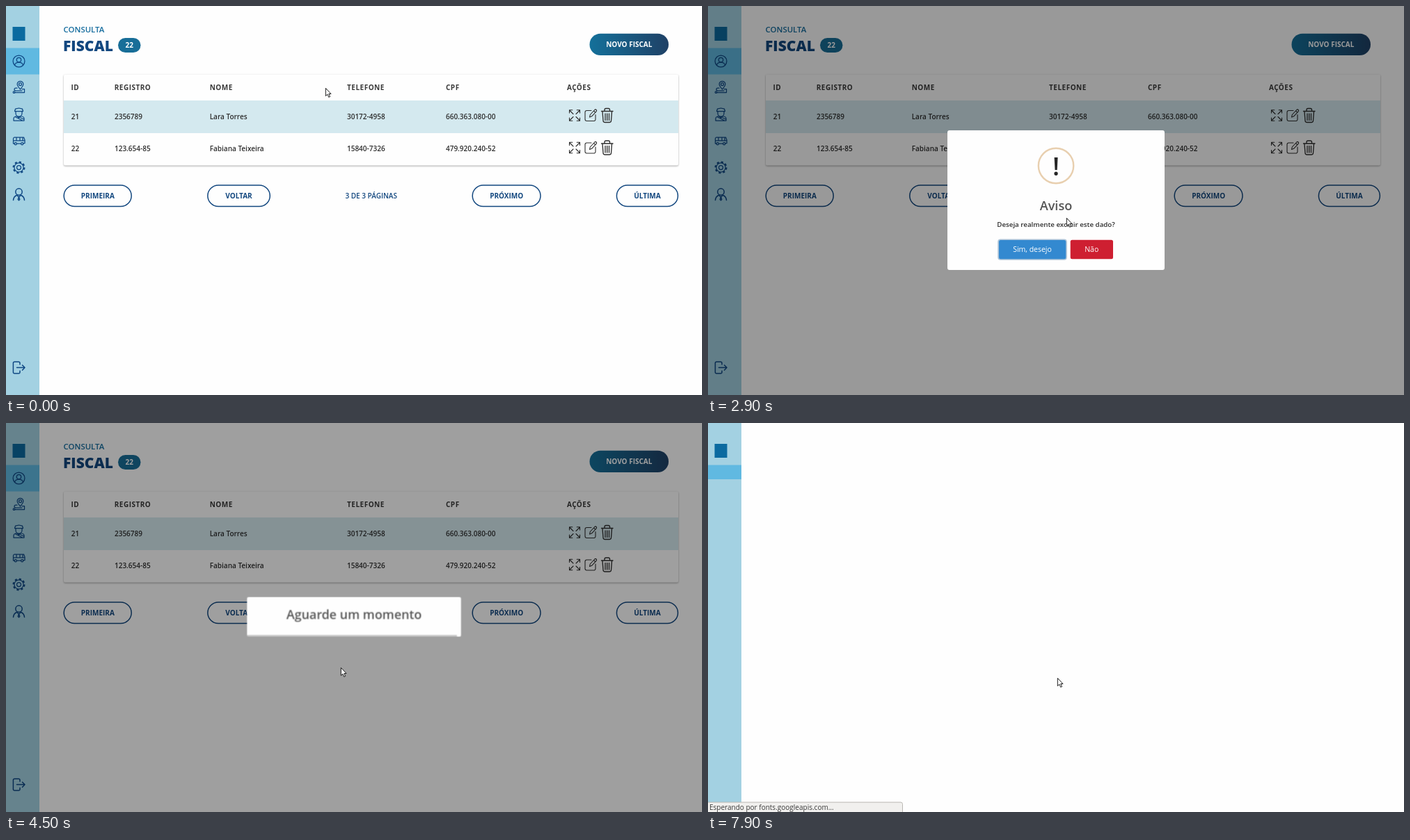
Animation, 1000 px wide and 560 px high, one loop 8 s. Source, as an HTML page:

```html
<!DOCTYPE html>
<html lang="pt-BR">
<head>
<meta charset="utf-8">
<title>Consulta fiscal</title>
<style>
html, body { margin: 0; height: 100%; overflow: hidden; background: #fefefe; }
svg { display: block; width: 100vw; height: 100vh; }
text { font: 600 10px "Open Sans", "Noto Sans", sans-serif; fill: #2e2e2e; }
.mid { text-anchor: middle; }
.bold { font-weight: 700; }
.head text { font-weight: 700; letter-spacing: .5px; fill: #3a3a3a; }
.pager rect { fill: none; stroke: #12477f; stroke-width: 1.5; }
.pager text, .blue { fill: #12477f; }
.white { fill: #fff; }
.icon { fill: none; stroke: #0f4783; stroke-width: 1.25; stroke-linecap: round; stroke-linejoin: round; }
.act { fill: none; stroke: #2e2e2e; stroke-width: 1.1; stroke-linecap: round; stroke-linejoin: round; }
.card { filter: drop-shadow(0 1px .9px rgba(0, 0, 0, .34)); }
.title { font-size: 18.1px; fill: #565656; }
.btn { font-weight: 400; font-size: 10.5px; fill: #fff; }

/* One loop is 8 s; 1% is 80 ms. */
.anim { animation: 8s linear infinite both paused; }
.step { animation-timing-function: step-end; }
#shade { animation-name: shade; }
#ask { transform-origin: 500px 279.5px; animation-name: ask; }
#wait { transform-origin: 500px 279px; animation-name: wait; }
#bar { transform-origin: 344px 0; animation-name: bar; }
#yes { animation-name: press; }
#cursor { animation-name: move; }
#arrow { animation-name: arrow; }
#hand { animation-name: hand; }
#page { animation-name: page; }
#side { animation-name: side; }
#menu { animation-name: page; }
#active { animation-name: active; }
#status { animation-name: status; }
#tls { animation-name: tls; }
#http { animation-name: http; }

@keyframes shade {
  0% { opacity: 0; }
  29.2875% { opacity: 0; animation-timing-function: ease; }
  30.5375% { opacity: .4; }
  54.375% { opacity: .4; animation-timing-function: ease; }
  55.37% { opacity: 0; }
  55.375% { opacity: 0; animation-timing-function: ease; }
  56.625% { opacity: .4; }
  86.7125% { opacity: .4; animation-timing-function: ease; }
  87.9625%, 100% { opacity: 0; }
}
@keyframes ask {
  0%, 29.28% { opacity: 0; transform: scale(.7); }
  29.2875% { opacity: 1; transform: scale(.7); animation-timing-function: ease; }
  30.975% { transform: scale(1.05); animation-timing-function: ease; }
  32.2875% { transform: scale(.95); animation-timing-function: ease; }
  33.0375% { transform: scale(1); }
  54.375% { opacity: 1; transform: scale(1); animation-timing-function: ease; }
  56.25%, 100% { opacity: 0; transform: scale(.5); }
}
@keyframes wait {
  0%, 55.37% { opacity: 0; transform: scale(.7); }
  55.375% { opacity: 1; transform: scale(.7); animation-timing-function: ease; }
  57.0625% { transform: scale(1.05); animation-timing-function: ease; }
  58.375% { transform: scale(.95); animation-timing-function: ease; }
  59.125% { transform: scale(1); }
  86.7125% { opacity: 1; transform: scale(1); animation-timing-function: ease; }
  88.5875%, 100% { opacity: 0; transform: scale(.5); }
}
@keyframes bar {
  0%, 55.65% { transform: scaleX(1); }
  86.8%, 100% { transform: scaleX(0); }
}
@keyframes press {
  0% { fill: #3389d0; }
  48.75% { fill: #2e7bbb; }
  52.5%, 100% { fill: #296ca5; }
}
@keyframes move {
  0%, 2.5% { transform: translate(459px, 118px); }
  3.75%, 5% { transform: translate(413px, 131px); }
  6.25% { transform: translate(355px, 150px); }
  8.75% { transform: translate(212px, 194px); }
  10% { transform: translate(165px, 210px); }
  11.25% { transform: translate(205px, 221px); }
  12.5% { transform: translate(330px, 224px); }
  13.75% { transform: translate(475px, 217px); }
  15% { transform: translate(605px, 209px); }
  16.25% { transform: translate(700px, 203px); }
  17.5% { transform: translate(750px, 193px); }
  20% { transform: translate(818px, 188px); }
  22.5% { transform: translate(853px, 198px); }
  25%, 30% { transform: translate(861px, 206px); }
  31.25% { transform: translate(838px, 217px); }
  33.75% { transform: translate(660px, 270px); }
  36.25% { transform: translate(515px, 305px); }
  37.5% { transform: translate(489px, 307px); }
  38.75% { transform: translate(485px, 309px); }
  40%, 42.5% { transform: translate(482px, 312px); }
  43.75% { transform: translate(510px, 306px); }
  45% { transform: translate(540px, 301px); }
  46.25% { transform: translate(544px, 309px); }
  47.5% { transform: translate(518px, 327px); }
  48.75% { transform: translate(492px, 344px); }
  50%, 53.75% { transform: translate(481px, 350px); }
  55%, 56.25% { transform: translate(481px, 352px); }
  61.25%, 100% { transform: translate(502px, 367px); }
}
@keyframes hand {
  0% { opacity: 0; }
  23.75% { opacity: 1; }
  29.5% { opacity: 0; }
  48.75% { opacity: 1; }
  55%, 100% { opacity: 0; }
}
@keyframes arrow {
  0% { opacity: 1; }
  23.75% { opacity: 0; }
  29.5% { opacity: 1; }
  48.75% { opacity: 0; }
  55%, 100% { opacity: 1; }
}
@keyframes page { 0% { opacity: 1; } 92.5%, 100% { opacity: 0; } }
@keyframes side { 0% { opacity: 1; } 92.5% { opacity: 0; } 95%, 100% { opacity: 1; } }
@keyframes active { 0% { height: 38px; } 92.5%, 100% { height: 20.5px; } }
@keyframes status { 0% { opacity: 0; } 96.25%, 100% { opacity: 1; } }
@keyframes tls { 0% { opacity: 1; } 98.75%, 100% { opacity: 0; } }
@keyframes http { 0% { opacity: 0; } 98.75%, 100% { opacity: 1; } }
</style>
</head>
<body>
<svg viewBox="0 0 1000 560" preserveAspectRatio="none">
  <defs>
    <linearGradient id="deep"><stop stop-color="#14709a"/><stop offset="1" stop-color="#1f4166"/></linearGradient>
    <clipPath id="sheet"><rect x="344" y="250" width="312" height="58" rx="3"/></clipPath>
    <g id="actions" class="act">
      <path d="M815 155.500l-5.500-5.500m0 4v-4.300h4.300M819 155.500l5.500-5.500m-4.300-.3h4.300v4.300M815 159.500l-5.500 5.500m0-4v4.300h4.300M819 159.500l5.500 5.500m0-4v4.300h-4.300"/>
      <path d="M841 150.500h-6.500a2.500 2.500 0 0 0-2.500 2.500v10a2.500 2.500 0 0 0 2.500 2.500h10a2.500 2.500 0 0 0 2.500-2.500v-6.500M838.500 160l.8-3.500 6.500-7a1.600 1.600 0 0 1 2.300 2.300l-6.500 7zM844.500 151l2.200 2.200"/>
      <path d="M855.500 151.500h16.500M860 151.300v-1.800a2 2 0 0 1 2-2h3.500a2 2 0 0 1 2 2v1.800M857 152l1 13a2.600 2.600 0 0 0 2.600 2.500h6.300a2.600 2.600 0 0 0 2.600-2.500l1-13M861 155v9.500M863.700 155v9.500M866.500 155v9.500" stroke-width="1.350"/>
    </g>
  </defs>

  <rect width="1000" height="560" fill="#fefefe"/>

  <g id="side" class="anim step">
    <rect width="48" height="560" fill="#a3d1e2"/>
    <rect id="active" class="anim step" y="60.500" width="48" height="38" fill="#60b9e1"/>
    <rect x="9.500" y="30" width="18" height="20" fill="#0b6aa0"/>
    <g id="menu" class="anim step">
      <g class="icon">
        <circle cx="18.500" cy="79.500" r="8.400"/><circle cx="18.500" cy="77.500" r="3.200"/>
        <path d="M12.500 85.300c.5-3 2.800-4.200 6-4.200s5.500 1.200 6 4.200"/>

        <circle cx="20.500" cy="112.500" r="2"/>
        <path d="M20.500 120c-2.500-3-4.300-5-4.300-7.400a4.300 4.300 0 0 1 8.600 0c0 2.400-1.800 4.400-4.300 7.400zM16 118h-2a2 2 0 0 0 0 4h9M23 119.500h3.500v5h-14"/><circle cx="11.500" cy="124.200" r="1.300"/>

        <path d="M12.500 151.500l1-3.300 5-1.200 5 1.200 1 3.300zM14 151.800v2.700a4.500 4.500 0 0 0 9 0v-2.700M11 165v-3c0-2 2-3 4.500-3.500l3 2.500 3-2.500c2.500.5 4.500 1.500 4.500 3.500v3zM13 159.500l10 5M16 158.500l9.500 4.500"/>

        <path d="M12 189h13.500l1.500 4v4.500h-2M21.500 198h-6M12 198h-1.500v-7a2 2 0 0 1 1.500-2M10.500 193.800H27M15 189v4.800M20 189v4.800M24 189v4.800"/>
        <circle cx="13.800" cy="198.200" r="1.600"/><circle cx="23.200" cy="198.200" r="1.600"/>

        <circle cx="18.500" cy="232.500" r="3"/><circle cx="18.500" cy="232.500" r="6.600"/>
        <circle cx="18.500" cy="232.500" r="7.900" stroke-width="2.200" stroke-linecap="butt" stroke-dasharray="3.100 3.105"/>

        <circle cx="18.500" cy="267.500" r="4.700" stroke-width="1.500"/>
        <path d="M10.500 279.500c.3-4 2.200-6 5.200-7.300l2.800 3 2.800-3c3 1.300 4.900 3.300 5.200 7.300M18.500 275l-1.200 3.500 1.200 1.300 1.200-1.300z" stroke-width="1.500"/>

        <path d="M20 516v-2a1.800 1.800 0 0 0-1.800-1.800h-6A1.800 1.800 0 0 0 10.400 514v13.200a1.800 1.800 0 0 0 1.800 1.800h6a1.800 1.800 0 0 0 1.800-1.800v-2M15.500 520.600H27M23.500 517l3.500 3.600-3.500 3.600" stroke-width="1.500"/>
      </g>
    </g>
  </g>

  <g id="page" class="anim step">
    <text x="82.500" y="38.300" style="font-size:11.400px;fill:#146c9e">CONSULTA</text>
    <text x="82" y="65" class="blue" style="font-size:21px;font-weight:800">FISCAL</text>
    <rect x="161" y="46" width="32.500" height="21" rx="10.500" fill="#186e98"/>
    <text x="177.200" y="60.200" class="mid bold white">22</text>
    <rect x="838.500" y="39.800" width="113.500" height="31.200" rx="15.600" fill="url(#deep)"/>
    <text x="895.300" y="59.200" class="mid bold white">NOVO FISCAL</text>

    <g class="card">
      <rect x="83" y="98.500" width="883" height="131" rx="2" fill="#fefefe"/>
    </g>
    <rect x="83" y="136" width="883" height="47" fill="#d4e9ef"/>
    <g class="head">
      <text x="93.500" y="121.300">ID</text><text x="155.700" y="121.300">REGISTRO</text><text x="292.700" y="121.300">NOME</text>
      <text x="490" y="121.300">TELEFONE</text><text x="632" y="121.300">CPF</text><text x="806" y="121.300">AÇÕES</text>
    </g>
    <text x="93.700" y="162.700">21</text><text x="156" y="162.700">2356789</text><text x="292.700" y="162.700">Lara Torres</text>
    <text x="490" y="162.700">30172-4958</text><text x="632" y="162.700">660.363.080-00</text>
    <text x="93.700" y="209.300">22</text><text x="156" y="209.300">123.654-85</text><text x="292.700" y="209.300">Fabiana Teixeira</text>
    <text x="490" y="209.300">15840-7326</text><text x="632" y="209.300">479.920.240-52</text>
    <use href="#actions"/><use href="#actions" y="46.500"/>

    <g class="pager mid bold">
      <rect x="83.200" y="258" width="97" height="30.500" rx="15.250"/><text class="bold" x="131.800" y="276.800">PRIMEIRA</text>
      <rect x="289.800" y="258" width="89.500" height="30.500" rx="15.250"/><text class="bold" x="334.500" y="276.800">VOLTAR</text>
      <text x="524.700" y="276.800">3 DE 3 PÁGINAS</text>
      <rect x="670.200" y="258" width="97.800" height="30.500" rx="15.250"/><text class="bold" x="719.200" y="276.800">PRÓXIMO</text>
      <rect x="877.400" y="258" width="88" height="30.500" rx="15.250"/><text class="bold" x="921.400" y="276.800">ÚLTIMA</text>
    </g>
  </g>

  <rect id="shade" class="anim" width="1000" height="560"/>

  <g id="ask" class="anim mid">
    <rect x="344" y="179" width="312" height="201" rx="3" fill="#fefefe"/>
    <circle cx="500" cy="230" r="25.200" fill="none" stroke="#e8cfaf" stroke-width="2.400"/>
    <text x="500" y="243.500" style="font-size:36.600px;fill:#262626">!</text>
    <text x="500" y="293.700" class="title">Aviso</text>
    <text x="500" y="317.800" style="font-size:9.750px">Deseja realmente excluir este dado?</text>
    <rect x="416.200" y="335.400" width="99.600" height="30.400" rx="4" fill="#adc4d8"/>
    <rect id="yes" class="anim step" x="418" y="337" width="96.200" height="27.200" rx="2.500"/>
    <text x="466" y="354.300" class="btn">Sim, desejo</text>
    <rect x="520.700" y="336.800" width="61.300" height="27.400" rx="2.500" fill="#ce1f31"/>
    <text x="551.200" y="354.300" class="btn">Não</text>
  </g>

  <g id="wait" class="anim mid">
    <g clip-path="url(#sheet)">
      <rect x="344" y="250" width="312" height="58" fill="#fefefe"/>
      <rect id="bar" class="anim" x="344" y="305.500" width="312" height="2.500" fill="#c5c5c5"/>
    </g>
    <text x="500" y="282.700" class="title">Aguarde um momento</text>
  </g>

  <g id="status" class="anim step">
    <path d="M-1 561V546H277a2.500 2.500 0 0 1 2.500 2.500V561z" fill="#f1f0ee" stroke="#b9b7b3"/>
    <text id="tls" class="anim step" x="2" y="557" style="font-weight:400;fill:#3a3a3a">Executando um handshake TLS com fonts.googleapis.com…</text>
    <text id="http" class="anim step" x="2" y="557" style="font-weight:400;fill:#3a3a3a">Esperando por fonts.googleapis.com…</text>
  </g>

  <g id="cursor" class="anim" fill="#fff" stroke="#1c1c1c" stroke-linejoin="round">
    <path id="arrow" class="anim step" d="M.3.300V11.500L2.900 9.200 4.700 13.300 6.600 12.500 4.800 8.500H8z"/>
    <path id="hand" class="anim step" stroke-width=".9" d="M.2 1.100a.9.900 0 0 1 1.800 0V4.500l4 .7q1 .3 1 1.300V9L6.200 12H1.200L-2 8q-.2-1.400 1-1.100L.2 7.900zM3.300 5v1.500M4.800 5.200v1.500"/>
  </g>
</svg>
<script>
const LOOP = 8000, TICK = 100;
const parts = document.getAnimations();
const start = performance.now();
let shown = -1;

function draw(now) {
  const time = Math.max(0, now - start) % LOOP;
  const tick = Math.floor(time / TICK) * TICK;
  if (tick !== shown) {
    shown = tick;
    for (const part of parts) part.currentTime = tick + .01;
  }
  requestAnimationFrame(draw);
}
draw(start);
</script>
</body>
</html>
```
